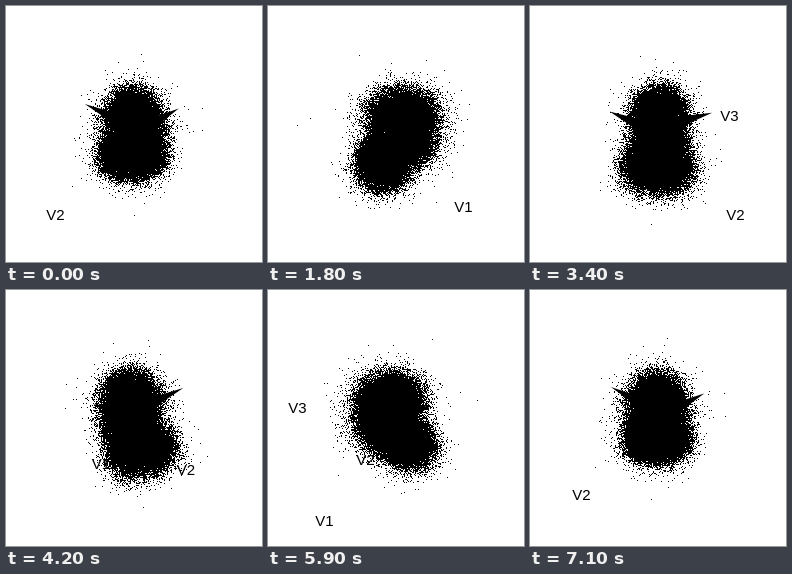
Recreate the animation shown at these times as an HTML page with a canvas. Size 256x256 px, loop 7200 ms.

```html
<!DOCTYPE html>
<html lang="en">
<head>
<meta charset="utf-8">
<title>Rotating point cloud</title>
<style>
  html, body { margin: 0; width: 100%; height: 100%; overflow: hidden; background: #fff; }
  canvas, svg { position: absolute; left: 0; top: 0; width: 256px; height: 256px; }
  text { font: 15px "Liberation Sans", Arial, sans-serif; text-anchor: middle; }
</style>
</head>
<body>
<canvas id="cloud" width="256" height="256"></canvas>
<svg id="marks" viewBox="0 0 256 256"></svg>
<script>
const SIZE = 256, MID = 128, LOOP = 7200, STEP = 100;
const DIST = 240, TILT = 0.342, RAD = Math.PI / 180;

const ctx = document.getElementById('cloud').getContext('2d');
const svg = document.getElementById('marks');
const image = ctx.createImageData(SIZE, SIZE);
const pixels = new Uint32Array(image.data.buffer);

let seed = 20317;
function rand() {
  seed = (seed + 0x6D2B79F5) | 0;
  let t = Math.imul(seed ^ (seed >>> 15), 1 | seed);
  t = (t + Math.imul(t ^ (t >>> 7), 61 | t)) ^ t;
  return ((t ^ (t >>> 14)) >>> 0) / 4294967296;
}
const gauss = () =>
  Math.sqrt(-2 * Math.log(1 - rand())) * Math.cos(2 * Math.PI * rand());

// Each lobe is a box with half sizes `box`, blurred by `sigma`.
const lobes = [
  { count: 25000, at: [0, -18, 7], box: [0, 0, 0], sigma: [11.5, 11.5, 15] },
  { count: 20000, at: [0, 6, 10], box: [6, 0, 0], sigma: [11, 10, 12] },
  { count: 28000, at: [-2, 26, -12], box: [20, 7, 10], sigma: [9, 8, 9.5] }
];

const points = new Float32Array(3 * lobes.reduce((n, l) => n + l.count, 0));
let fill = 0;
for (const { count, at, box, sigma } of lobes) {
  for (let i = 0; i < count; i++) {
    const spread = rand() < 0.06 ? 1.4 : 1;
    for (let a = 0; a < 3; a++) {
      points[fill++] = at[a] + box[a] * (2 * rand() - 1) + sigma[a] * spread * gauss();
    }
  }
}

// Position from the turn (degrees) at which a part faces the viewer.
const polar = (front, r, y) => [-r * Math.sin(front * RAD), y, r * Math.cos(front * RAD)];

function add(tag) {
  return svg.appendChild(document.createElementNS('http://www.w3.org/2000/svg', tag));
}

const ears = [[105, 54, -27], [-103, 48, -23]].map(([front, r, y]) => ({
  el: add('polygon'),
  corners: [polar(front, r, y), polar(front, 22, y + 7), polar(front, 22, y + 18)]
}));

const labels = [
  ['V1', polar(-5, 70, 76)],
  ['V2', polar(85, 76, 76)],
  ['V3', polar(42.5, 118, 0.5)]
].map(([name, pos]) => {
  const el = add('text');
  el.textContent = name;
  return { el, pos };
});

function project(x, y, z, c, s) {
  const depth = z * c - x * s;
  const k = 1 / (1 - depth / DIST);
  return [MID + (x * c + z * s) * k, MID + (y + depth * TILT) * k];
}

function draw(turn) {
  const c = Math.cos(turn * RAD), s = Math.sin(turn * RAD);

  pixels.fill(0xffffffff);
  for (let i = 0; i < points.length; i += 3) {
    const [px, py] = project(points[i], points[i + 1], points[i + 2], c, s);
    const x = Math.floor(px), y = Math.floor(py);
    if (x >= 0 && x < SIZE && y >= 0 && y < SIZE) pixels[y * SIZE + x] = 0xff000000;
  }
  ctx.putImageData(image, 0, 0);

  for (const { el, corners } of ears) {
    el.setAttribute('points', corners.map(p => project(...p, c, s)).join(' '));
  }

  // A label vanishes as soon as its anchor leaves the stage.
  for (const { el, pos } of labels) {
    const [x, y] = project(...pos, c, s);
    const base = y + 5.5;
    const shown = x >= 9 && x <= SIZE && base <= 255.5;
    el.setAttribute('x', Math.round(x * 2) / 2 - 0.5);
    el.setAttribute('y', Math.round(base));
    el.setAttribute('visibility', shown ? 'visible' : 'hidden');
  }
}

const start = performance.now();
let last = -1;
function tick() {
  const time = (performance.now() - start) % LOOP;
  const step = Math.floor(time / STEP);
  if (step !== last) {
    last = step;
    draw(step * 360 * STEP / LOOP);
  }
  requestAnimationFrame(tick);
}
tick();
</script>
</body>
</html>
```
